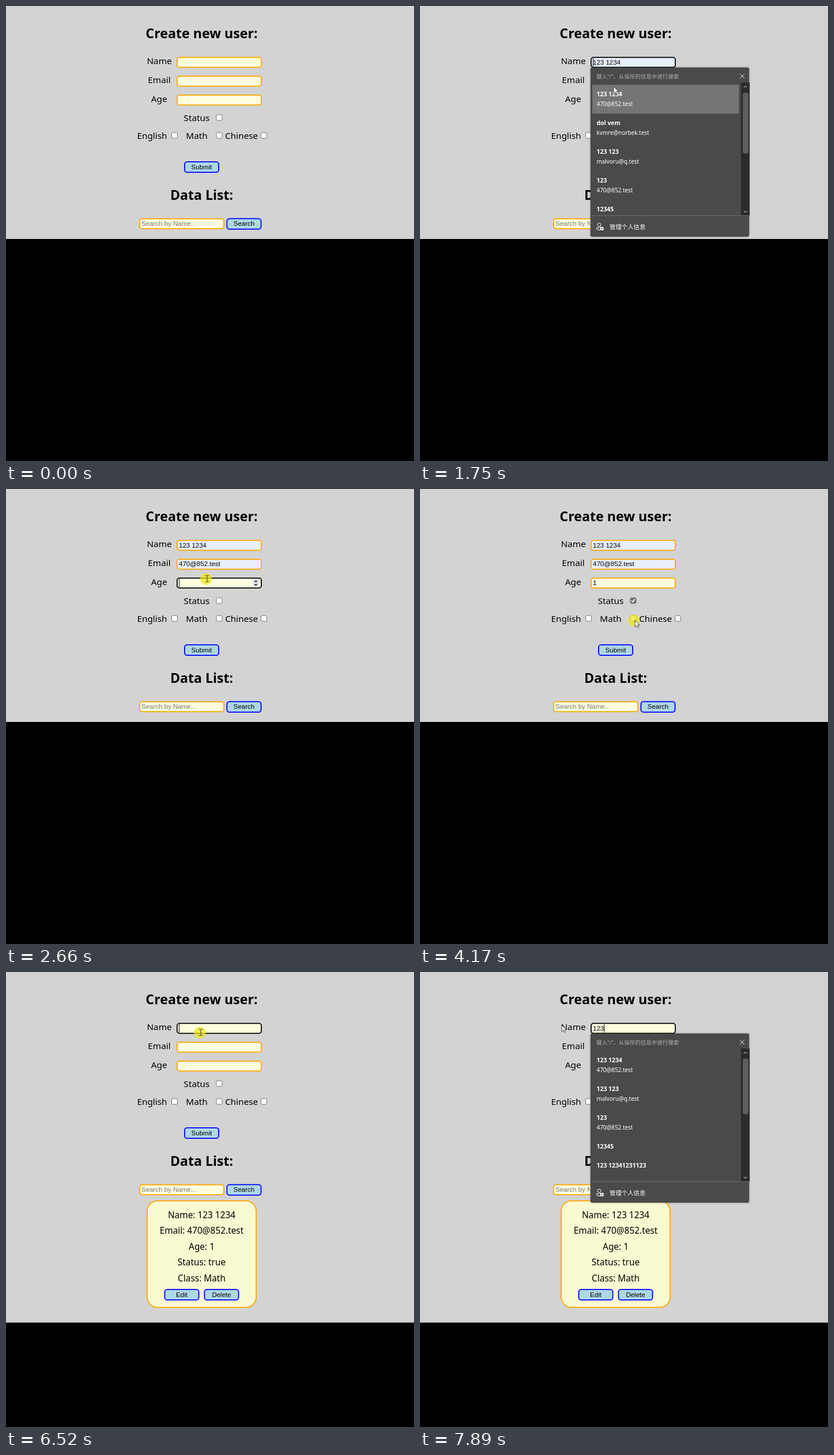
Recreate the animation shown at these times as an HTML page with a canvas. Size 708 by 791 pixels, loop 8000 ms.

```html
<!DOCTYPE html>
<html lang="en">
<head>
<meta charset="utf-8">
<title>Create new user</title>
<style>
  html, body { margin: 0; width: 100%; height: 100%; overflow: hidden; background: #000; }
  canvas { display: block; }
</style>
</head>
<body>
<canvas id="stage" width="708" height="791"></canvas>
<script>
const ctx = document.getElementById('stage').getContext('2d');
const LOOP = 8000;
const LABEL = '"Noto Sans", "Open Sans", "Noto Sans CJK SC", sans-serif';
const CONTROL = '"Liberation Sans", Arial, sans-serif';
const USER = '123 1234', MAIL = '470@852.test';
const MID = 339.5;

const CONTACTS = [
  [USER, MAIL], ['dol vem', 'kvmre@norbek.test'], ['123 123', 'malvoru@q.test'],
  ['123', MAIL], ['12345'], ['123 12341231123']
];

// time, x, y of the pointer's hot spot
const PATH = [
  [110, 676, 764], [880, 333, 86], [1010, 334, 88], [1080, 334, 95], [1480, 334, 96],
  [1750, 336, 140], [2240, 336, 142], [2590, 349, 156], [2920, 349, 156], [3340, 371, 196],
  [3480, 371, 196], [3690, 372, 227], [4170, 373, 228], [4240, 373, 228], [4450, 357, 276],
  [5980, 357, 276], [6450, 338, 105], [7280, 338, 105], [7890, 246, 92]
];
const PRESSES = [[880, 1010], [1340, 1480], [2170, 2240], [2590, 2720],
  [3410, 3550], [4100, 4240], [4450, 4590], [6450, 6590]];

const within = (v, a, b) => v >= a && v < b;
const inside = (p, x, y, w, h) => within(p.x, x, x + w) && within(p.y, y, y + h);

function pointerAt(t) {
  const i = PATH.findIndex(k => k[0] > t);
  if (i < 0) { const [, x, y] = PATH[PATH.length - 1]; return { x, y }; }
  const [t0, x0, y0] = PATH[i - 1], [t1, x1, y1] = PATH[i];
  const u = (t - t0) / (t1 - t0), e = u * u * (3 - 2 * u);
  return { x: x0 + (x1 - x0) * e, y: y0 + (y1 - y0) * e };
}

function text(str, x, y, size, { color = '#000', align = 'left', weight = 400, family = LABEL } = {}) {
  ctx.font = `${weight} ${size}px ${family}`;
  ctx.fillStyle = color;
  ctx.textAlign = align;
  ctx.fillText(str, x, y);
}

function box(x, y, w, h, r, fill, stroke, line = 1.8) {
  ctx.beginPath();
  ctx.roundRect(x + line / 2, y + line / 2, w - line, h - line, r);
  ctx.fillStyle = fill;
  ctx.fill();
  if (stroke) {
    ctx.strokeStyle = stroke;
    ctx.lineWidth = line;
    ctx.stroke();
  }
}

function poly(points, { fill, stroke, width = 1, close = true }) {
  ctx.beginPath();
  points.forEach(([x, y]) => ctx.lineTo(x, y));
  if (close) ctx.closePath();
  if (fill) { ctx.fillStyle = fill; ctx.fill(); }
  if (stroke) { ctx.strokeStyle = stroke; ctx.lineWidth = width; ctx.stroke(); }
}

function field(x, y, { value = '', filled, focus, hint } = {}) {
  box(x, y, 148, 19, 4, filled ? '#e8f0fe' : '#ffffe0', focus ? '#000' : '#ffa500');
  text(value || hint || '', x + 4, y + 13, 11.5, { family: CONTROL, color: hint ? '#757575' : '#000' });
}

function caret(x, y) {
  ctx.fillStyle = '#000';
  ctx.fillRect(x, y + 2.5, 1, 14);
}

function button(label, x, y, hot) {
  box(x, y, 61, 20, 4.4, hot ? '#00f' : '#add8e6', '#00f');
  text(label, x + 30.5, y + 13.6, 11.5, { family: CONTROL, align: 'center', color: hot ? '#fff' : '#000' });
}

function checkbox(x, y, checked) {
  box(x - 5.5, y - 5.5, 11, 11, 2, checked ? '#767676' : '#fff', '#767676', 1);
  if (checked) poly([[x - 3, y], [x - 1, y + 2.3], [x + 3, y - 2.6]], { stroke: '#fff', width: 1.6, close: false });
}

function spinner(x, y) {
  ctx.fillStyle = '#efefef';
  ctx.fillRect(x - 6, y - 7, 12, 14);
  for (const s of [-1, 1]) {
    poly([[x - 3.5, y + s * 1.5], [x + 3.5, y + s * 1.5], [x, y + s * 5.5]], { fill: '#505050' });
  }
}

function card() {
  box(244, 397, 191, 187, 18, '#f9f9d2', '#ffa500');
  [`Name: ${USER}`, `Email: ${MAIL}`, 'Age: 1', 'Status: true', 'Class: Math'].forEach((line, i) =>
    text(line, MID, 428 + i * 27.4, 15.4, { align: 'center' }));
  button('Edit', 274.5, 551);
  button('Delete', 343.5, 551);
}

function popup(filtered, hovered) {
  ctx.save();
  ctx.shadowColor = 'rgba(0,0,0,.5)';
  ctx.shadowBlur = 3;
  box(295, 106, 277, 296, 3, '#4a4a4a');
  ctx.restore();
  text('键入“/”，从保存的信息中进行搜索', 306, 125.5, 9.5, { color: '#b0b0b0' });
  for (const s of [-1, 1]) {
    poly([[555, 122 - 4 * s], [563, 122 + 4 * s]], { stroke: '#e4e4e4', close: false });
  }

  if (hovered) box(299, 137, 254.5, 50, 1, '#757575', null, 0);
  ctx.save();
  ctx.beginPath();
  ctx.rect(295, 133, 262, 231);
  ctx.clip();
  let y = 156.7;
  for (const [name, mail] of CONTACTS.filter(c => !filtered || c[0].startsWith('1'))) {
    text(name, 306.5, y, 10.4, { color: '#fff', weight: 700 });
    if (mail) text(mail, 306.5, y + 17.3, 9.9, { color: '#fff' });
    y += mail ? 50.1 : 33;
  }
  ctx.restore();

  ctx.fillStyle = '#2b2b2b';
  ctx.fillRect(557, 133, 15, 231);
  box(560, 150.5, 10, filtered ? 97 : 106, 4, '#5c5c5c', null, 0);
  for (const [ay, s] of [[140.5, 1], [357.5, -1]]) {
    poly([[562, ay + 1.5 * s], [564.7, ay - 1.5 * s], [567.4, ay + 1.5 * s]], { stroke: '#ddd', close: false });
  }

  ctx.fillStyle = '#707070';
  ctx.fillRect(295, 364, 277, 1);
  ctx.strokeStyle = '#fff';
  ctx.lineWidth = 1;
  ctx.beginPath();
  ctx.arc(311, 380.5, 3, 0, 7);
  ctx.stroke();
  poly([[312, 389.5], [308, 389], [306.3, 387], [306.3, 385.5], [311, 385.5]], { stroke: '#fff', close: false });
  box(312.5, 384, 6, 6, 1, '#fff', null, 0);
  ctx.fillStyle = '#4a4a4a';
  ctx.fillRect(314, 386, 3, 0.8);
  ctx.fillRect(314, 387.7, 3, 0.8);
  text('管理个人信息', 329, 387.8, 10.4, { color: '#fff' });
}

function pointer({ x, y }, beam, pressed) {
  if (pressed) {
    ctx.beginPath();
    ctx.arc(x - 1.7, y + 0.5, 10.3, 0, 7);
    ctx.fillStyle = 'rgba(240,230,20,.7)';
    ctx.fill();
  }
  ctx.save();
  ctx.translate(x, y);
  if (beam) {
    ctx.fillStyle = '#333';
    ctx.fillRect(-0.5, -5.5, 1, 11);
    for (const end of [-6, 5]) {
      ctx.fillRect(-3, end, 2.5, 1);
      ctx.fillRect(0.5, end, 2.5, 1);
    }
  } else {
    poly([[0, 0], [0, 11.5], [2.6, 9.2], [4.3, 13.2], [6.3, 12.3], [4.6, 8.5], [8.2, 8.5]],
      { fill: '#fff', stroke: '#222', width: 0.8 });
  }
  ctx.restore();
}

function draw(t) {
  const p = t >= 110 ? pointerAt(t) : { x: -99, y: -99 };
  const open = within(t, 1480, 2240) || t >= 6660;
  const rowHover = open && inside(p, 299, 137, 254, 50);
  const filled = within(t, 2240, 4590);
  const typed = t < 7280 ? '' : '123'.slice(0, t < 7420 ? 1 : t < 7560 ? 2 : 3);
  const nameFocus = within(t, 1340, 2590) || t >= 6500;
  const ageFocus = within(t, 2590, 3410);
  const age = within(t, 2920, 4590) ? '1' : '';
  const listed = t >= 4990;

  ctx.fillStyle = '#000';
  ctx.fillRect(0, 0, 708, 791);
  ctx.fillStyle = '#d3d3d3';
  ctx.fillRect(0, 0, 708, listed ? 609.5 : 405);

  text('Create new user:', MID, 56, 23.2, { align: 'center', weight: 700 });
  text('Data List:', MID, 337, 23.1, { align: 'center', weight: 700 });
  for (const [label, x, y] of [['Name', 266, 101.3], ['Email', 266, 134.3], ['Age', 265.7, 166.8],
    ['Status', 331, 199.5], ['English', 253.5, 230.7], ['Math', 331, 230.7], ['Chinese', 408.7, 230.7]]) {
    text(label, x, y, 15.3, { align: 'center' });
  }

  const preview = filled || rowHover;
  field(296, 88.5, { value: preview ? USER : typed, filled: preview, focus: nameFocus });
  field(296, 121.3, { value: preview ? MAIL : '', filled: preview });
  field(296, 154, { value: age, focus: ageFocus });
  if (ageFocus || (!open && inside(p, 296, 154, 148, 19))) spinner(433.5, 163.5);

  // The caret blinks from the latest focus or key press.
  const since = [1340, 2590, 2920, 6520, 7280, 7420, 7560].filter(k => k <= t).pop();
  if ((nameFocus || ageFocus) && Math.floor((t - since) / 540) % 2 === 0) {
    ctx.font = `11.5px ${CONTROL}`;
    caret(300 + ctx.measureText(nameFocus ? typed : age).width, nameFocus ? 88.5 : 154);
  }

  checkbox(370, 194, within(t, 3480, 4590));
  checkbox(292.5, 225);
  checkbox(370, 225, within(t, 4240, 4590));
  checkbox(447.5, 225);
  button('Submit', 309, 270, inside(p, 309, 270, 61, 20));

  field(231, 369, { hint: 'Search by Name...' });
  button('Search', 382.5, 368.7);
  if (listed) card();
  if (open) popup(t >= 7280, rowHover);

  const overField = [88.5, 121.3, 154].some(y => inside(p, 296, y, 148, 19));
  const overPopup = open && inside(p, 295, 106, 277, 296);
  pointer(p, overField && !overPopup, PRESSES.some(([a, b]) => within(t, a, b)));
}

const start = performance.now();
function tick() {
  draw((performance.now() - start) % LOOP);
  requestAnimationFrame(tick);
}
tick();
</script>
</body>
</html>
```
